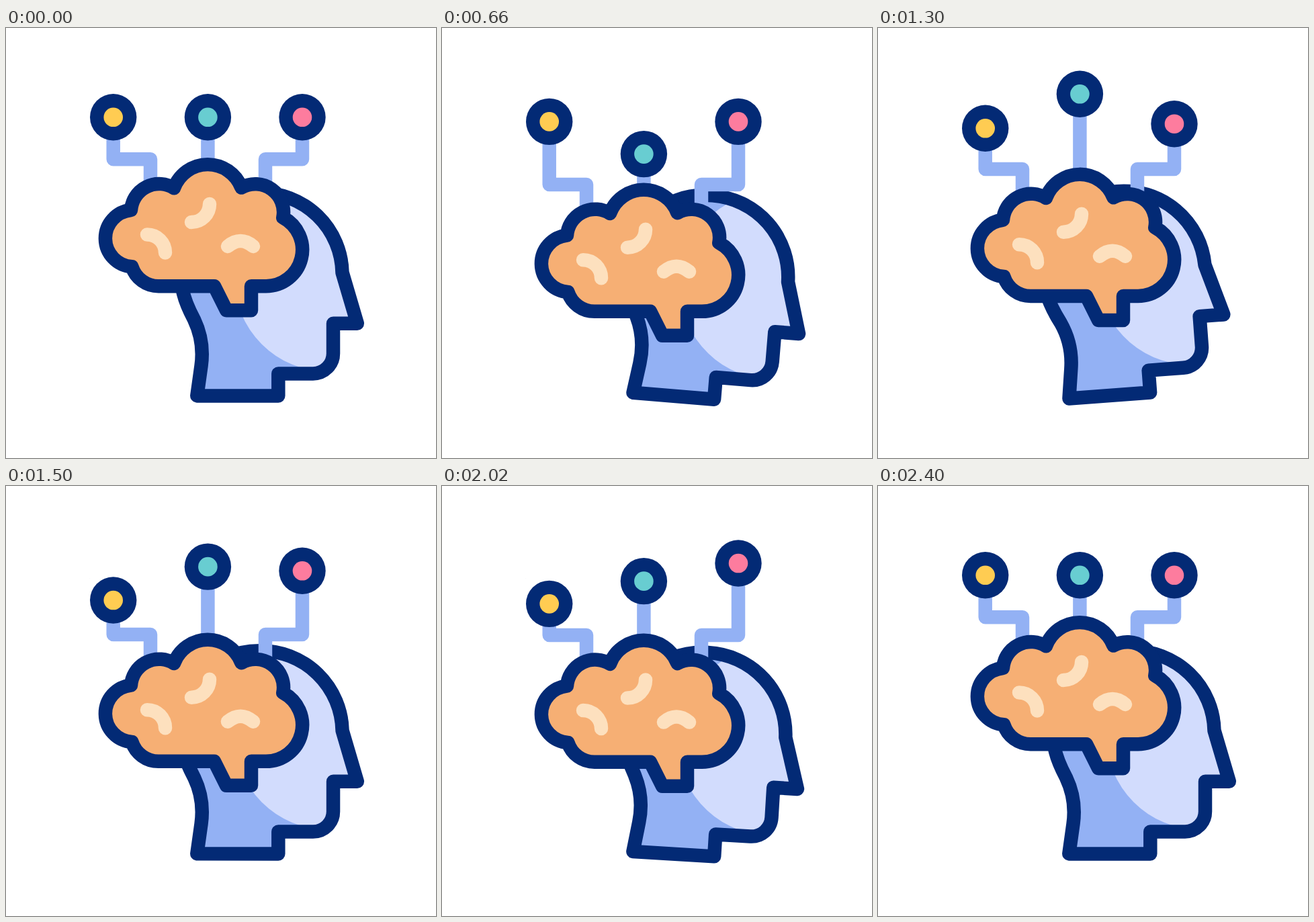
An HTML page for the animation above (2420 ms loop, 640 by 640 pixels).

```html
<!DOCTYPE html>
<html lang="en">
<head>
<meta charset="utf-8">
<title>Thinking head</title>
<style>
  html, body { margin: 0; width: 100%; height: 100%; overflow: hidden; background: #fff; }
  svg { display: block; width: 100vw; height: 100vh; }
  .line { fill: none; stroke: #032a75; stroke-width: 20.48; stroke-linejoin: round; stroke-linecap: round; }
  .wire { fill: none; stroke: #93b1f4; stroke-width: 20.48; stroke-linejoin: round; }
  .fold { fill: none; stroke: #fde0be; stroke-width: 20.48; stroke-linecap: round; }
</style>
</head>
<body>
<svg viewBox="0 0 640 640">
  <defs>
    <path id="skull" d="M284.3 547.4H405.3V514.4H457A30 30 0 0 0 487 484.4V439.7H522.8L500.5 364
      A121.5 121.5 0 0 0 378 245.2C300 245 250 310 262.5 388C265 403 271 417 280 434
      C290 455 294 478 290.5 503Z"/>
    <path id="cortex" d="M250 238.3A53.6 53.6 0 0 1 350.4 237.6A42 42 0 0 1 412.3 282.1
      A54.2 54.2 0 0 1 387 384.2H365V420.2H328L310 384.2H227
      A41.5 41.5 0 0 1 187.4 355.3A42.3 42.3 0 0 1 186 271A42 42 0 0 1 250 238.3Z"/>
    <clipPath id="inside"><use href="#skull"/></clipPath>
  </defs>
  <g id="head">
    <use href="#skull" fill="#93b1f4"/>
    <circle cx="479.5" cy="371.5" r="140" fill="#d2dcfd" clip-path="url(#inside)"/>
    <use href="#skull" class="line"/>
  </g>
  <g id="wires"></g>
  <g id="brain">
    <use href="#cortex" fill="#f6af74"/>
    <use href="#cortex" class="line"/>
    <path class="fold" d="M303 262C303 277 291 289 276 289M210 307.5C225 307.5 237 319.5 237 334.5M330 325Q349 309 368 325"/>
  </g>
  <g id="nodes"></g>
</svg>
<script>
  const LOOP = 2420, STEP = 600, UNIT = 1.28, NODE_Y = 132.8, BEND_Y = 195.3;

  // Poses at 0, 600, 1200, 1800 and 2400 ms
  const tilt = [0, 5, -5, 5, 0];
  const sink = [0, 30, 10, 30, 0];
  const nodes = [
    { x: 159.7, foot: 215, color: '#ffcc52', drop: [0, 5, 10, 48, 0] },
    { x: 300.4, foot: 300.4, color: '#68cdd1', drop: [0, 45, -30, 10, 0] },
    { x: 441, foot: 386, color: '#fd7c9e', drop: [0, 5, 10, -20, 0] }
  ];

  const $ = id => document.getElementById(id);

  function add(parent, tag, attrs) {
    const el = document.createElementNS('http://www.w3.org/2000/svg', tag);
    for (const key in attrs) el.setAttribute(key, attrs[key]);
    return parent.appendChild(el);
  }

  for (const n of nodes) {
    n.wire = add($('wires'), 'path', { class: 'wire' });
    n.knob = add($('nodes'), 'g', {});
    add(n.knob, 'circle', { cx: n.x, cy: NODE_Y, r: 34.7, fill: '#032a75' });
    add(n.knob, 'circle', { cx: n.x, cy: NODE_Y, r: 14.3, fill: n.color });
  }

  // Eased value between neighbouring poses
  function at(poses, time) {
    const i = Math.min(Math.floor(time / STEP), poses.length - 2);
    const p = Math.min(time / STEP - i, 1);
    return poses[i] + (poses[i + 1] - poses[i]) * p * p * (3 - 2 * p);
  }

  function draw(time) {
    const dy = at(sink, time) * UNIT;
    $('head').setAttribute('transform', `rotate(${at(tilt, time)} 340 547.4)`);
    $('brain').setAttribute('transform', `translate(0 ${dy})`);
    for (const n of nodes) {
      const drop = at(n.drop, time) * UNIT;
      const bend = n.foot === n.x ? '' : `V${BEND_Y + dy}H${n.foot}`;
      n.knob.setAttribute('transform', `translate(0 ${drop})`);
      n.wire.setAttribute('d', `M${n.x} ${NODE_Y + drop}${bend}V${(bend ? 234 : 205) + dy}`);
    }
  }

  const start = performance.now();
  function tick() {
    draw((performance.now() - start) % LOOP);
    requestAnimationFrame(tick);
  }
  tick();
</script>
</body>
</html>
```
